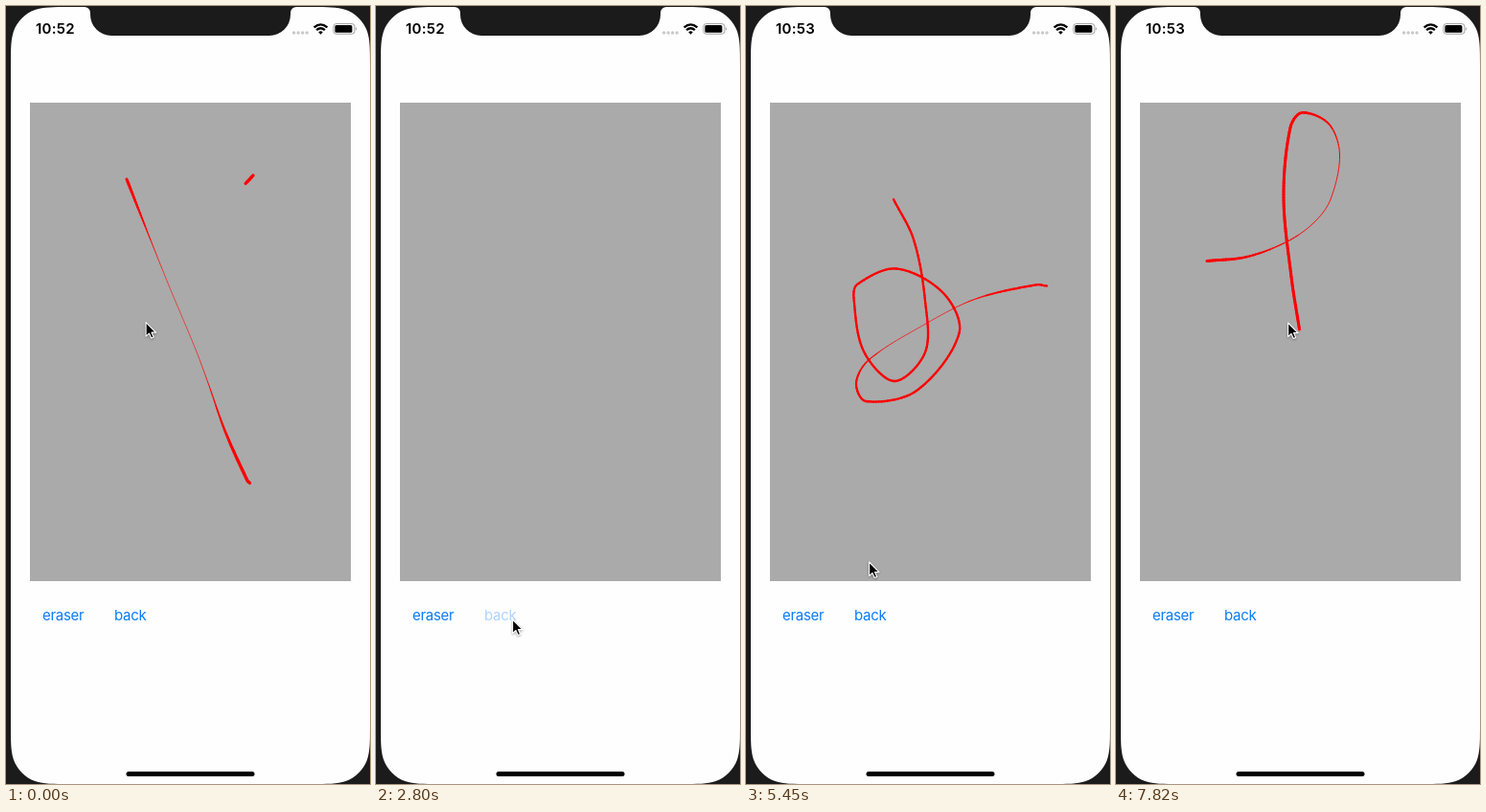
Animation of 380 by 813 pixels, one loop 8000 ms. Source, as an HTML page with a canvas:

```html
<!DOCTYPE html>
<html lang="en">
<head>
<meta charset="utf-8">
<title>Drawing pad</title>
<style>
  html, body { margin: 0; width: 100%; height: 100%; overflow: hidden; background: #fefefe; }
  svg, canvas { position: absolute; left: 0; top: 0; width: 380px; height: 813px; display: block; }
  text { font-family: Inter, "Liberation Sans", sans-serif; font-size: 15px; }
  .btn { fill: #0a7cf5; letter-spacing: -.3px; }
  #clock { font-weight: 600; letter-spacing: .25px; }
</style>
</head>
<body>
<svg viewBox="0 0 380 813">
  <defs>
    <path id="corner" d="M0 0H61.1C43.5 0 34.7 0 25.3 3C14.9 6.8 6.8 14.9 3 25.3C0 34.7 0 43.5 0 61.1Z"/>
  </defs>
  <rect width="380" height="813" fill="#fefefe"/>
  <g fill="#1b1b1b">
    <path d="M0 0H380V1H5V813H0Z"/>
    <use href="#corner" transform="translate(5 1)"/>
    <use href="#corner" transform="translate(380 1) scale(-1 1)"/>
    <use href="#corner" transform="translate(5 813) scale(1 -1)"/>
    <use href="#corner" transform="translate(380 813) scale(-1 -1)"/>
    <path d="M82 0V1A6 6 0 0 1 88 7V9A22 22 0 0 0 110 31H275A22 22 0 0 0 297 9V7A6 6 0 0 1 303 1V0Z"/>
  </g>
  <text id="clock" x="31" y="29.3">10:52</text>
  <path d="M300.6 28H315" stroke="#c9c9c9" stroke-width="3.4" stroke-linecap="round" stroke-dasharray="0 4.5"/>
  <g fill="none" stroke="#000" stroke-width="2.3">
    <path d="M321.6 22.4Q328.5 16.4 335.4 22.4"/>
    <path d="M324.1 25.2Q328.5 21.4 332.9 25.2"/>
  </g>
  <path d="M326.2 27.3Q328.5 25.4 330.8 27.3L328.5 29.7Z"/>
  <rect x="341.9" y="18.6" width="22" height="10.6" rx="2.8" fill="none" stroke="#a0a0a0"/>
  <rect x="343.4" y="20.1" width="18" height="7.6" rx="1.5"/>
  <path d="M365 22.1Q367 24 365 25.8Z" fill="#a0a0a0"/>
  <rect x="25" y="101" width="335" height="500" fill="#aaa"/>
  <text id="eraser" class="btn" x="38" y="641.5">eraser</text>
  <text id="back" class="btn" x="113" y="641.5">back</text>
  <rect x="125.5" y="800" width="134" height="5" rx="2.5"/>
</svg>
<canvas id="pad" width="380" height="813"></canvas>
<svg viewBox="0 0 380 813">
  <g id="cursor" style="filter:drop-shadow(0 1px 1px rgba(0,0,0,.35))">
    <path d="M.6 1V15.6L4 12.5L6.2 17.5L8.7 16.4L6.5 11.6H11Z" stroke="#fff" stroke-width="1.1" stroke-linejoin="round"/>
  </g>
</svg>
<script>
const LOOP = 8000, TICK = 147.2, LEAD = 11, LAST = 53;
const $ = id => document.getElementById(id);
const ctx = $('pad').getContext('2d');

const clamp = u => Math.max(0, Math.min(1, u));
const ease = u => (u = clamp(u)) * u * (3 - 2 * u);

// Smooth curve through a few points, sampled about every 3 px
function trace(points) {
  const p = points.split(' ').map(s => s.split(',').map(Number));
  const gap = (a, b) => Math.hypot(b[0] - a[0], b[1] - a[1]);
  const slope = (i, c) => {
    const a = p[i - 1] || p[i], b = p[i], d = p[i + 1] || b;
    return (d[c] - a[c]) / (gap(a, b) + gap(b, d));
  };
  const out = [p[0]];
  for (let i = 0; i < p.length - 1; i++) {
    const len = gap(p[i], p[i + 1]), n = Math.ceil(len / 3);
    for (let j = 1; j <= n; j++) {
      const f = j / n, g = 1 - f;
      out.push([0, 1].map(c => p[i][c] * g * g * (1 + 2 * f) + p[i + 1][c] * f * f * (3 - 2 * f)
        + len * f * g * (slope(i, c) * g - slope(i + 1, c) * f)));
    }
  }
  return out;
}

// start, span: drawing time in ticks; gone: tick of removal.
// The line thins from max to min around the fast part of the move.
const strokes = [
  { path: trace('126,181 146,232 170,292 198,359 211,394 229,445 252,496 254.5,498.5'),
    start: -9, span: 2, gone: 19, max: 3.3, min: .6, fast: .45, width: .36 },
  { path: trace('258,177 231,207 195,256 150,328 106,406 85,451 67.5,490.5'),
    start: -.22, span: 2, gone: 15, max: 3.3, min: .65, fast: .55, width: .3 },
  { path: trace('154,202 175,244 187,308 187,362 155,392 123,361 112.5,305 116,291 157,274.5 '
      + '206,300 222.5,342 178,402 125,413 115,394 128,370 186,333 240,306 303,291.3 314,292.5'),
    start: 27.8, span: 6.5, gone: 43, max: 2.3, min: .7, fast: .84, width: .09 },
  { path: trace('95,266.5 137,262 179,246 207,226 224,202 233.5,155 222,123 194,111.5 '
      + '182,127 175,200 183,283 191.5,338'),
    start: 49.5, span: 3.5, gone: 99, max: 3, min: .9, fast: .3, width: .2 }
];
const progress = (s, k) => ease((k - s.start) / s.span);

// Pointer stops between strokes: tick, x, y
const stops = [[2,66,490], [7,70,622], [8,62,630], [11,142,640], [20,142,640], [27,151,201],
  [34,318,290], [37,128,580], [41,62,633], [43,62,633], [47,92,264], [49,92,264], [53,179,330]];

const taps = { back: [15, 19], eraser: [43] };

// While drawing, the pointer runs a little ahead of the ink
function pointer(k) {
  const s = strokes.find(s => k + .8 > s.start && k + .8 < s.start + s.span);
  if (s) {
    const [x, y] = s.path[Math.round(progress(s, k + .8) * (s.path.length - 1))];
    return [x - 3, y - 1];
  }
  const i = Math.max(1, stops.findIndex(p => p[0] >= k));
  const [t0, x0, y0] = stops[i - 1], [t1, x1, y1] = stops[i];
  const e = ease((k - t0) / (t1 - t0));
  return [x0 + (x1 - x0) * e, y0 + (y1 - y0) * e];
}

function drawStroke(s, k) {
  const n = s.path.length - 1, end = Math.round(progress(s, k) * n);
  for (let i = 1; i <= end; i++) {
    const w = s.max - (s.max - s.min) * Math.exp(-(((i / n - s.fast) / s.width) ** 4));
    ctx.lineWidth = w;
    ctx.lineCap = w > 1.6 ? 'round' : 'butt';
    ctx.beginPath();
    ctx.moveTo(...s.path[i - 1]);
    ctx.lineTo(...s.path[i]);
    ctx.stroke();
  }
}

function render(k) {
  ctx.clearRect(0, 0, 380, 813);
  ctx.strokeStyle = '#f00';
  for (const s of strokes) if (k < s.gone) drawStroke(s, k);
  $('cursor').setAttribute('transform', `translate(${pointer(k)})`);
  $('clock').textContent = k < 33 ? '10:52' : '10:53';
  for (const id in taps) {
    const since = Math.min(...taps[id].map(t => k < t ? 9 : k - t));
    $(id).style.opacity = Math.min(1, .32 + .34 * since);
  }
}

let shown = -1;
function frame() {
  const t = performance.now() % LOOP;
  const k = Math.min(LAST, Math.floor((t + LEAD) / TICK));
  if (k !== shown) render(shown = k);
  requestAnimationFrame(frame);
}
frame();
</script>
</body>
</html>
```
